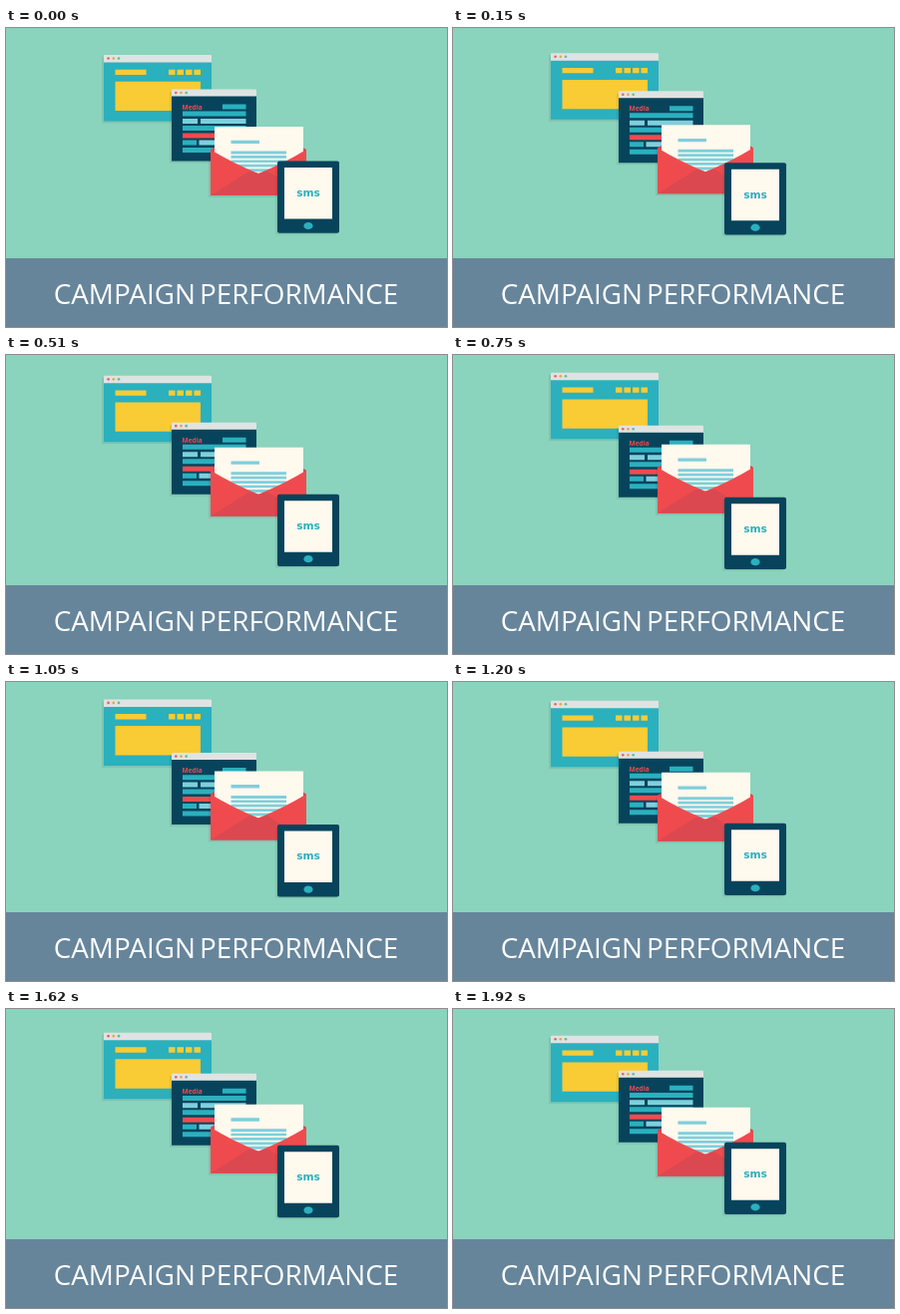
Write an HTML page that moves like this. It is 442 px wide and 300 px high and loops after 1.95 s.

```html
<!DOCTYPE html>
<html lang="en">
<head>
<meta charset="utf-8">
<title>Campaign performance</title>
<style>
  html, body { margin: 0; width: 100%; height: 100%; overflow: hidden; background: #8ad3bd; }
  svg { display: block; width: 442px; height: 300px; }
  .teal { fill: #2bb0be; }
  .navy { fill: #07445c; }
  .gold { fill: #f9cb34; }
  .red { fill: #ef4b4f; }
  .rose { fill: #dc4850; }
  .sky { fill: #7fcfdc; }
  .cream { fill: #fff9ee; }
  .bar { fill: #dfe3e2; }
  .shade { fill: #000; opacity: .07; }
</style>
</head>
<body>
<svg viewBox="0 0 442 300">
  <defs>
    <g id="dots">
      <circle r="1.3" fill="#e8605a"/>
      <circle cx="5.2" r="1.3" fill="#eba53f"/>
      <circle cx="10.4" r="1.3" fill="#62b9a0"/>
    </g>
  </defs>
  <rect width="442" height="300" fill="#8ad3bd"/>

  <!-- landing page -->
  <g data-dir="-1">
    <path class="shade" d="M96 29h108v66.5H96z"/>
    <path class="teal" d="M98 34h108v59.5H98z"/>
    <path class="bar" d="M98 34.5V28q0-1 1-1h106q1 0 1 1v6.5z"/>
    <use href="#dots" x="102.6" y="30.5"/>
    <path class="gold" d="M109.5 41.7H140.5V47h-31zM163 41.7h6.5V47H163zM171.5 41.7h6.5V47h-6.5zM180 41.7h6.5V47H180zM188.5 41.7h6.5V47h-6.5zM109.5 53.7H195V83h-85.5z"/>
  </g>

  <!-- media page -->
  <g data-dir="1">
    <path class="shade" d="M164 64h85v71.500h-85z"/>
    <path class="navy" d="M166 68h85v65.500h-85z"/>
    <path class="bar" d="M166 68.500v-6q0-1 1-1h83q1 0 1 1v6z"/>
    <use href="#dots" x="170.3" y="65"/>
    <text class="red" x="176.5" y="81.600" font-family="'Open Sans', sans-serif" font-size="6.6" font-weight="700">Media</text>
    <path class="teal" d="M217 76.500h23.5v5H217zM177 83.600h63.5v5H177zM177 98h63.5v5H177zM177 112.500h14v5h-14zM177 120h63.500v5H177z"/>
    <path class="sky" d="M177 91h15v5h-15zM195 91h45.5v5H195zM193.5 112.500H230v5h-36.5z"/>
    <path class="red" d="M177 105.500h40v5h-40z"/>
  </g>

  <!-- letter -->
  <g data-dir="-1">
    <path class="shade" d="M203 124h95v46h-95z"/>
    <path class="rose" d="M205 122l5-3h86l5 3v20h-96z"/>
    <path class="cream" d="M209 99h89v50h-89z"/>
    <path class="sky" d="M225.5 112.7H254V116h-28.5zM225.5 123.5H281v3h-55.5zM225.5 128H281v2.7h-55.5zM225.5 132.4H281v2.7h-55.5zM225.5 136.8H281v2.7h-55.5zM225.5 141.2H281v3h-55.5z"/>
    <path class="red" d="M205 122Q227 135.500 253 146Q279 135.500 301 122v46h-96z"/>
    <path class="rose" d="M205 168l39-24.500 9 2.500 9-2.500 39 24.500z"/>
  </g>

  <!-- phone -->
  <g data-dir="1">
    <rect class="shade" x="270" y="135.500" width="62" height="72" rx="2"/>
    <rect class="navy" x="272" y="133.500" width="62" height="72.300" rx="2"/>
    <path class="cream" d="M279 140h48v51.500h-48z"/>
    <ellipse class="teal" cx="303" cy="198.500" rx="4.600" ry="3.600"/>
    <text class="teal" x="303" y="168.800" text-anchor="middle" font-family="'DejaVu Sans', sans-serif" font-size="10.600" font-weight="700">sms</text>
  </g>

  <rect y="231" width="442" height="69" fill="#66859b"/>
  <text x="220.500" y="277" text-anchor="middle" font-family="'Open Sans', sans-serif" font-size="27.800" word-spacing="-3" fill="#fff">CAMPAIGN PERFORMANCE</text>
</svg>
<script>
  const LOOP = 1950, TRAVEL = 9.8;
  // [time in ms, share of the travel]
  const keys = [[0, 0], [300, .35], [750, .94], [900, 1], [1050, .98], [1350, .7], [1620, .34], [LOOP, 0]];
  const layers = document.querySelectorAll('[data-dir]');

  function shift(t) {
    const i = keys.findIndex(k => k[0] > t);
    const [t0, a] = keys[i - 1], [t1, b] = keys[i];
    return TRAVEL * (a + (b - a) * (t - t0) / (t1 - t0));
  }

  function draw() {
    const t = Math.floor(performance.now() % LOOP / 30) * 30;
    const y = shift(t);
    for (const layer of layers) {
      layer.setAttribute('transform', `translate(0 ${layer.dataset.dir * y})`);
    }
    requestAnimationFrame(draw);
  }
  draw();
</script>
</body>
</html>
```
